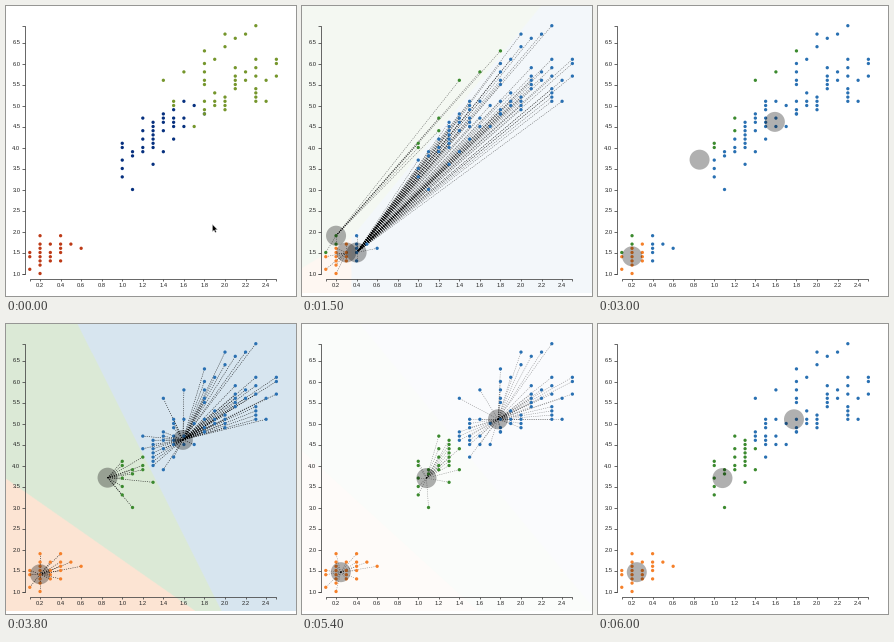
A matplotlib script that plays this animation: 290 by 290 pixels, repeating every 6100 ms.

```python
import numpy as np
import matplotlib.pyplot as plt
from matplotlib.animation import FuncAnimation
from matplotlib.collections import LineCollection
from matplotlib.colors import to_rgb
from matplotlib.patches import Circle, Polygon

SIZE, DPI = 290, 100
FRAMES, STEP = 61, 100
PX = 72 / DPI  # points per pixel
INK = "#444444"

# Petal measurements in mm: {width: lengths}, one dict per species
SPECIES = [
    {1: [11, 14, 15], 2: [10, 12, 13, 14, 15, 16, 17, 19],
     3: [13, 14, 15, 17], 4: [13, 15, 16, 17, 19], 5: [17], 6: [16]},
    {10: [33, 35, 37, 40, 41], 11: [30, 38, 39], 12: [39, 40, 42, 44, 47],
     13: [36, 40, 41, 42, 43, 44, 45, 46], 14: [39, 44, 46, 47, 48],
     15: [42, 45, 46, 47, 49], 16: [45, 47, 51], 17: [50], 18: [48]},
    {14: [56], 15: [50, 51], 16: [58], 17: [45],
     18: [48, 49, 51, 55, 56, 58, 60, 63], 19: [50, 51, 53, 61],
     20: [49, 50, 51, 52, 64, 67], 21: [54, 55, 56, 57, 59, 66],
     22: [56, 58, 67], 23: [51, 52, 53, 54, 57, 59, 61, 69],
     24: [51, 56], 25: [57, 60, 61]},
]
SPECIES_RGB = np.array([to_rgb(c) for c in ("#bd3a17", "#06307f", "#75962c")])
CLUSTER_RGB = np.array([to_rgb(c) for c in ("#f5802a", "#3b8a2e", "#2970b2")])
TINT_RGB = np.array([to_rgb(c) for c in ("#fce4d4", "#dbead6", "#d8e5ef")])


def to_px(points):
    """Data units (width, length) to stage pixels."""
    return np.asarray(points) * [102.75, -42.0] + [13.5, 309.5]


def ramp(t, start, end):
    return float(np.clip((t - start) / (end - start), 0, 1))


def ease(u):
    return 4 * u**3 if u < 0.5 else 1 - (2 - 2 * u) ** 3 / 2


def nearest(points, centers):
    gaps = points[..., None, :] - centers
    return (gaps**2).sum(-1).argmin(-1)


rows = [(w / 10, v / 10, k) for k, s in enumerate(SPECIES)
        for w, lengths in s.items() for v in lengths]
dots_xy = to_px([r[:2] for r in rows])
species_rgb = SPECIES_RGB[[r[2] for r in rows]]

# Centres of the orange, green and blue clusters after each iteration
CENTERS = [to_px(c) for c in (
    [(0.3, 1.5), (0.2, 1.9), (0.4, 1.5)],
    [(0.2, 1.41), (0.857, 3.71), (1.59, 4.61)],
    [(0.246, 1.46), (1.08, 3.7), (1.776, 5.1)],
)]
MOVES = [(2300, 2800), (4300, 4850)]
# Each assignment: fade-in start and end, fade-out start and end
FADES = [(1300, 1600, 1650, 1900), (3400, 3700, 3850, 4200),
         (5250, 5550, 5700, 6000)]

grid = np.stack(np.meshgrid(np.arange(0.25, SIZE, 0.5),
                            np.arange(0.25, 287, 0.5)), -1)
owners = [nearest(dots_xy, c) for c in CENTERS]
tints = [TINT_RGB[nearest(grid, c)] for c in CENTERS]
palettes = [species_rgb] + [CLUSTER_RGB[o] for o in owners]

fig = plt.figure(figsize=(SIZE / DPI, SIZE / DPI), dpi=DPI, facecolor="white")
ax = fig.add_axes([0, 0, 1, 1])


def line(xs, ys):
    ax.plot(xs, ys, color=INK, lw=0.8 * PX, zorder=1, solid_capstyle="butt")


def label(x, y, value, ha):
    ax.text(x, y, f"{value:.1f}", family="Liberation Sans", size=5.8 * PX,
            color="#222222", ha=ha, va="center_baseline", zorder=1)


def draw_axes():
    left, right = to_px([(0.1, 1), (2.5, 1)])[:, 0]
    bottom, top = to_px([(0, 1), (0, 6.9)])[:, 1]
    line([left, left, right, right], [275, 272.5, 272.5, 275])
    line([16, 18.5, 18.5, 16], [top, top, bottom, bottom])
    for w in np.arange(0.2, 2.5, 0.2):
        x = to_px((w, 0))[0]
        line([x, x], [272.5, 275])
        label(x, 278.6, w, "center")
    for v in np.arange(1, 6.6, 0.5):
        y = to_px((0, v))[1]
        line([16, 18.5], [y, y])
        label(14.5, y, v, "right")


tint = ax.imshow(tints[0], extent=(0, SIZE, 287, 0), zorder=0, alpha=0)
draw_axes()
links = LineCollection([], colors="black", linewidths=0.55 * PX,
                       linestyles=(0, (2, 2)), zorder=2)
ax.add_collection(links)
dots = ax.scatter(*dots_xy.T, s=(3.3 * PX) ** 2, c=species_rgb, lw=0, zorder=3)
discs = [ax.add_patch(Circle((0, 0), 10, fc=(0, 0, 0, 0.31), ec="none", zorder=4))
         for _ in range(3)]
ARROW = np.array([(0, 0), (0, 7), (1.6, 5.6), (2.7, 8), (3.8, 7.5),
                  (2.8, 5.2), (4.9, 5.1)])
cursor = ax.add_patch(Polygon(ARROW, fc="black", ec="#cccccc", lw=0.4 * PX,
                              zorder=5))
ax.set(xlim=(0, SIZE), ylim=(SIZE, 0), aspect="auto")
ax.axis("off")


def update(frame):
    t = frame * STEP

    cursor.set_visible(t < 800)
    cursor.set_xy(ARROW + [206.5, 218.5 + 56 * ease(ramp(t, 300, 700))])

    centers = CENTERS[0]
    for (start, end), goal in zip(MOVES, CENTERS[1:]):
        centers = centers + (goal - centers) * ease(ramp(t, start, end))
    for disc, center in zip(discs, centers):
        disc.center = center
        disc.set_visible(t >= 800)

    rgb, level = palettes[0], 0
    for k, (a, b, c, d) in enumerate(FADES):
        rgb = rgb + (palettes[k + 1] - rgb) * ramp(t, a, a + 150)
        if a < t < d:
            level = ramp(t, a, b) * (1 - ramp(t, c, d))
            tint.set_data(tints[k])
            links.set_segments(np.stack([centers[owners[k]], dots_xy], 1))
    dots.set_facecolor(rgb)
    tint.set_alpha(level**3)
    links.set_alpha(0.9 * level)
    return [tint, links, dots, cursor, *discs]


anim = FuncAnimation(fig, update, frames=FRAMES, interval=STEP, repeat=True)
plt.show()
```
